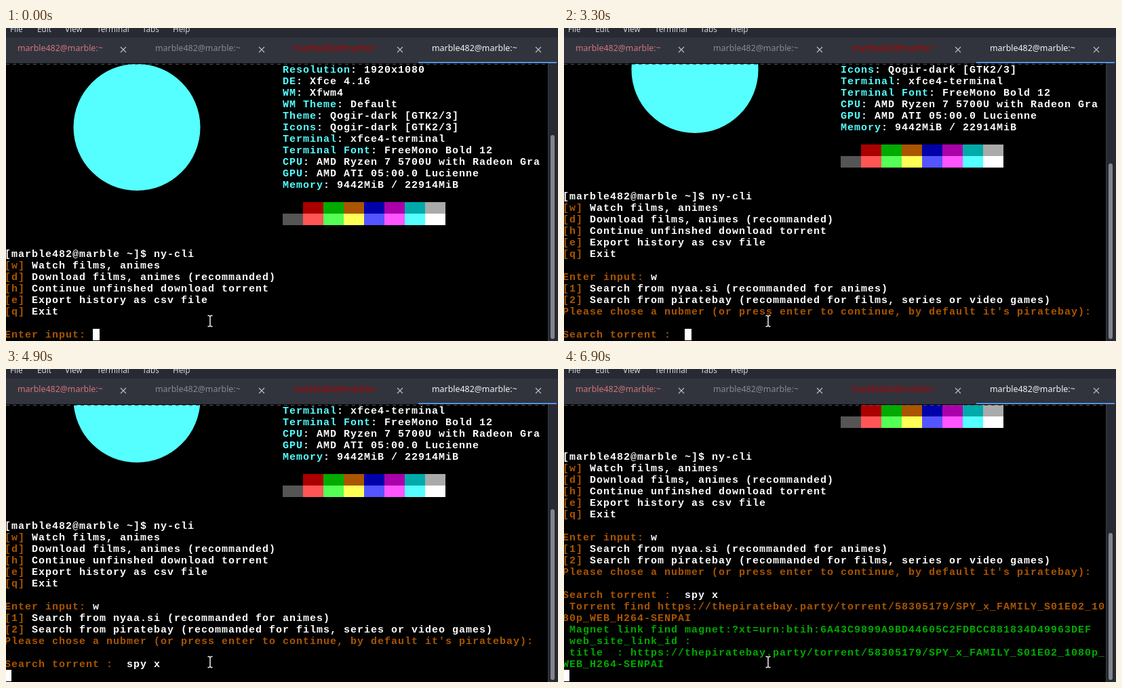
Recreate the animation shown at these times as an HTML page with a canvas. Size 814 px wide and 462 px high, loop 8 s.

```html
<!DOCTYPE html>
<html lang="en">
<head>
<meta charset="utf-8">
<title>Terminal</title>
<style>
html, body { margin: 0; width: 100%; height: 100%; overflow: hidden; background: #000; }
#stage { position: absolute; left: 0; top: 0; width: 814px; height: 462px; overflow: hidden; background: #000; }
canvas, svg { position: absolute; left: 0; top: 0; }
#view { position: absolute; left: 0; top: 53px; width: 799px; height: 409px; overflow: hidden; }
#text { position: absolute; left: -2px; top: 1px; margin: 0; white-space: pre; color: #fff;
  font: bold 15px/17px "Liberation Mono", monospace; letter-spacing: 0.9985px; font-variant-ligatures: none; }
.ui { position: absolute; white-space: pre; font: 12.4px/20px "Noto Sans", sans-serif; }
.menu { top: -9px; color: #d3d4d8; font-size: 11.7px; }
.tab { top: 20px; }
</style>
</head>
<body>
<div id="stage">
  <canvas id="shapes" width="814" height="462"></canvas>
  <div id="view"><pre id="text"></pre></div>
  <svg width="814" height="462">
    <defs>
      <path id="beamPath" d="M297.5 424.5h2l1.5 1.2l1.5-1.2h2M301 425.5v14M297.5 440.5h2l1.5-1.2l1.5 1.2h2"/>
    </defs>
    <g id="beam" fill="none">
      <use href="#beamPath" stroke="#000" stroke-width="3.4"/>
      <use href="#beamPath" stroke="#fff" stroke-width="1.4"/>
    </g>
    <path id="arrow" d="M301.5 430.5v15.5l3.6-3.4l2.6 6l2.7-1.2l-2.6-5.8h4.8z" fill="#111" stroke="#fff" stroke-width="1.2"/>
  </svg>
</div>
<script>
const LOOP = 8000, ROW = 17, TOP = 53, LEFT = -2, ROWS = 24;
const COLORS = { w: "#ffffff", c: "#55ffff", o: "#aa5500", g: "#00aa00",
  m: "#aa00aa", b: "#87afd7", y: "#afaf87", s: "#e4e4e4" };
const DARK = ["#000", "#a00", "#0a0", "#a50", "#00a", "#a0a", "#0aa", "#aaa"];
const LIGHT = ["#555", "#f55", "#5f5", "#ff5", "#55f", "#f5f", "#5ff", "#fff"];
const USER = "marble482@marble";

const $ = id => document.getElementById(id);
const ctx = $("shapes").getContext("2d");
const info = (key, value) => " ".repeat(41) + `{c}${key}{w}: ${value}`;
const option = (key, label) => `{o}[${key}]{w} ${label}`;

// {x} switches the text colour
const log = [
  info("Resolution", "1920x1080"),
  info("DE", "Xfce 4.16"),
  info("WM", "Xfwm4"),
  info("WM Theme", "Default"),
  info("Theme", "Qogir-dark [GTK2/3]"),
  info("Icons", "Qogir-dark [GTK2/3]"),
  info("Terminal", "xfce4-terminal"),
  info("Terminal Font", "FreeMono Bold 12"),
  info("CPU", "AMD Ryzen 7 5700U with Radeon Gra"),
  info("GPU", "AMD ATI 05:00.0 Lucienne"),
  info("Memory", "9442MiB / 22914MiB"),
  "", "", "", "", "",
  `[${USER} ~]$ ny-cli`,
  option("w", "Watch films, animes"),
  option("d", "Download films, animes (recommanded)"),
  option("h", "Continue unfinshed download torrent"),
  option("e", "Export history as csv file"),
  option("q", "Exit"),
  "",
  "{o}Enter input: {w}w",
  option(1, "Search from nyaa.si (recommanded for animes)"),
  option(2, "Search from piratebay (recommanded for films, series or video games)"),
  "{o}Please chose a nubmer (or press enter to continue, by default it's piratebay):",
  " ",
  "{o}Search torrent :  {w}spy x",
  "{o} Torrent find https://thepiratebay.party/torrent/58305179/SPY_x_FAMILY_S01E02_10",
  "{o}80p_WEB_H264-SENPAI",
  "{g} Magnet link find magnet:?xt=urn:btih:6A43C9899A9BD44605C2FDBCC881834D49963DEF",
  "{g} web_site_link_id :",
  "{g} title  : https://thepiratebay.party/torrent/58305179/SPY_x_FAMILY_S01E02_1080p_",
  "{g}WEB_H264-SENPAI",
  ""
];

const results = [
  "36743842/ImmoralLive.20.10.24.Ula.Venn.X.Father.And.Son.Spy.On.Horn..",
  "10604593/Create_X_-_Spy_On_New_Assignment",
  "33168286/GirlsOutWest.19.06.01.Hazel.Oak.Tavi.R.And.Orlena.Spy.Squa..",
  "58372886/SPY_x_FAMILY_S01E02_AAC_MP4-Mobile",
  "36749431/ImmoralLive.20.10.24.Ula.Venn.X.Father.And.Son.Spy.On.Horn..",
  "25534142/The.Spy.Who.Dumped.Me.2018.720p.WEB-DL.DD5.1.x264-iM_X",
  "20795906/Ch4_Dispatches_Russian_Spy_Assassins_The_Salisbury_Attack_..",
  "37899767/Austin.Powers.The.Spy.Who.Shagged.Me.1999.720p.BluRay.999M..",
  "33286515/Spies_of_War_Series_1_3of4_The_Spy_Who_Prevented_the_War_1..",
  "58305772/Spy_x_Family_-_02_(480p)(Multiple_Subtitle)(2863B04E)-Erai..",
  "58307654/SPY_x_FAMILY_S01E02_1080p_HEVC_x265-MeGusta",
  "58098289/Spy_x_Family_-_01_(480p)(Multiple_Subtitle)(1ECF8422)-Erai..",
  "58305773/Spy_x_Family_-_02_(720p)(Multiple_Subtitle)(09366184)-Erai..",
  "58098952/SPY_x_FAMILY_S01E01_1080p_WEB_H264-SENPAI",
  "58305179/SPY_x_FAMILY_S01E02_1080p_WEB_H264-SENPAI"
].map((path, i) => (i === 14 ? "{m}> {s}" : "  ") + "torrent/" + path);
const picker = [...Array(7).fill(""), ...results, "{y}  15/15", "{b}> "];

// start time, cursor line, cursor column, scrollbar top, picker open
const steps = [
  [0, 23, 13, 158], [1100, 23, 14, 158], [1200, 27, 1, 192],
  [3300, 28, 18, 200], [3700, 28, 20, 200], [4000, 28, 21, 200],
  [4400, 28, 22, 200], [4500, 28, 23, 200], [4900, 29, 0, 207],
  [5700, 23, 2, 55, true], [6200, 31, 0, 219], [6900, 35, 0, 242]
];

function rect(color, x, y, w, h) {
  ctx.fillStyle = color;
  ctx.fillRect(x, y, w, h);
}

function disc(color, x, y, r) {
  ctx.fillStyle = color;
  ctx.beginPath();
  ctx.arc(x, y, r, 0, Math.PI * 2);
  ctx.fill();
}

function label(text, cls, x, color) {
  const el = document.createElement("span");
  el.className = "ui " + cls;
  el.textContent = text;
  el.style.left = x + "px";
  if (color) el.style.color = color;
  $("stage").append(el);
}

// Appends one coloured line, cut to max characters
function addLine(out, line, max) {
  let left = max;
  line.split(/\{(\w)\}/).reduce((color, part, i) => {
    if (i % 2) return part;
    const span = document.createElement("span");
    span.style.color = COLORS[color];
    span.textContent = part.slice(0, left);
    left -= span.textContent.length;
    if (span.textContent) out.append(span);
    return color;
  }, "w");
  out.append("\n");
}

function drawFrame(barTop) {
  rect("#282a33", 0, 0, 814, 14);
  rect("#32343d", 0, 14, 814, 38);
  rect("#5294e2", 608, 50, 204, 2);
  ctx.strokeStyle = "#b8b9be";
  ctx.lineWidth = 1.2;
  for (let x = 173; x < 814; x += 204) {
    ctx.beginPath();
    ctx.moveTo(x - 4, 28);
    ctx.lineTo(x + 4, 36);
    ctx.moveTo(x + 4, 28);
    ctx.lineTo(x - 4, 36);
    ctx.stroke();
  }
  rect("#282a33", 799, 52, 15, 410);
  rect("#3a3c45", 799, 52, 1, 410);
  ctx.fillStyle = "#84858a";
  ctx.beginPath();
  ctx.roundRect(803, barTop, 6, 459 - barTop, 3);
  ctx.fill();
}

function drawLogShapes(top) {
  const y = TOP - top * ROW;
  disc("#55ffff", 193, y + 93.5, 93.5);
  [DARK, LIGHT].forEach((row, r) => row.forEach((color, i) =>
    rect(color, 408 + i * 30, y + (12 + r) * ROW, 30, ROW)));
  for (let x = 0; x < 799; x += 10) rect("#555", x, TOP, 5, 1);
}

function drawPickerShapes() {
  const y = TOP + 7 * ROW;
  rect("#303030", 0, y, 8, 15 * ROW);
  rect("#303030", 0, y + 14 * ROW, 598, ROW);
}

function show([, line, col, barTop, picking]) {
  const top = line - ROWS + 1;
  const lines = picking ? picker : log;
  const out = document.createDocumentFragment();
  for (let i = top; i <= line; i++) addLine(out, lines[i], i === line ? col : 80);
  $("text").replaceChildren(out);

  rect("#000", 0, 0, 814, 462);
  ctx.save();
  ctx.beginPath();
  ctx.rect(0, TOP, 799, ROWS * ROW);
  ctx.clip();
  if (picking) drawPickerShapes();
  else drawLogShapes(top);
  rect("#fff", LEFT + col * 10, TOP + (ROWS - 1) * ROW, 10, ROW);
  ctx.restore();
  drawFrame(barTop);

  $("beam").style.display = picking ? "none" : "";
  $("arrow").style.display = picking ? "" : "none";
}

[["File", 6], ["Edit", 46], ["View", 87], ["Terminal", 134], ["Tabs", 201], ["Help", 246]]
  .forEach(([name, x]) => label(name, "menu", x));
[[17, "#d0747a"], [220, "#87888e"], [424, "#b00000"], [628, "#f2f2f3"]]
  .forEach(([x, color]) => label(USER + ":~", "tab", x, color));

let shown, start;
function tick(now) {
  start ??= now;
  const t = (now - start) % LOOP;
  const step = steps.findLast(s => s[0] <= t) || steps[0];
  if (step !== shown) show(shown = step);
  requestAnimationFrame(tick);
}
show(shown = steps[0]);
requestAnimationFrame(tick);
</script>
</body>
</html>
```
